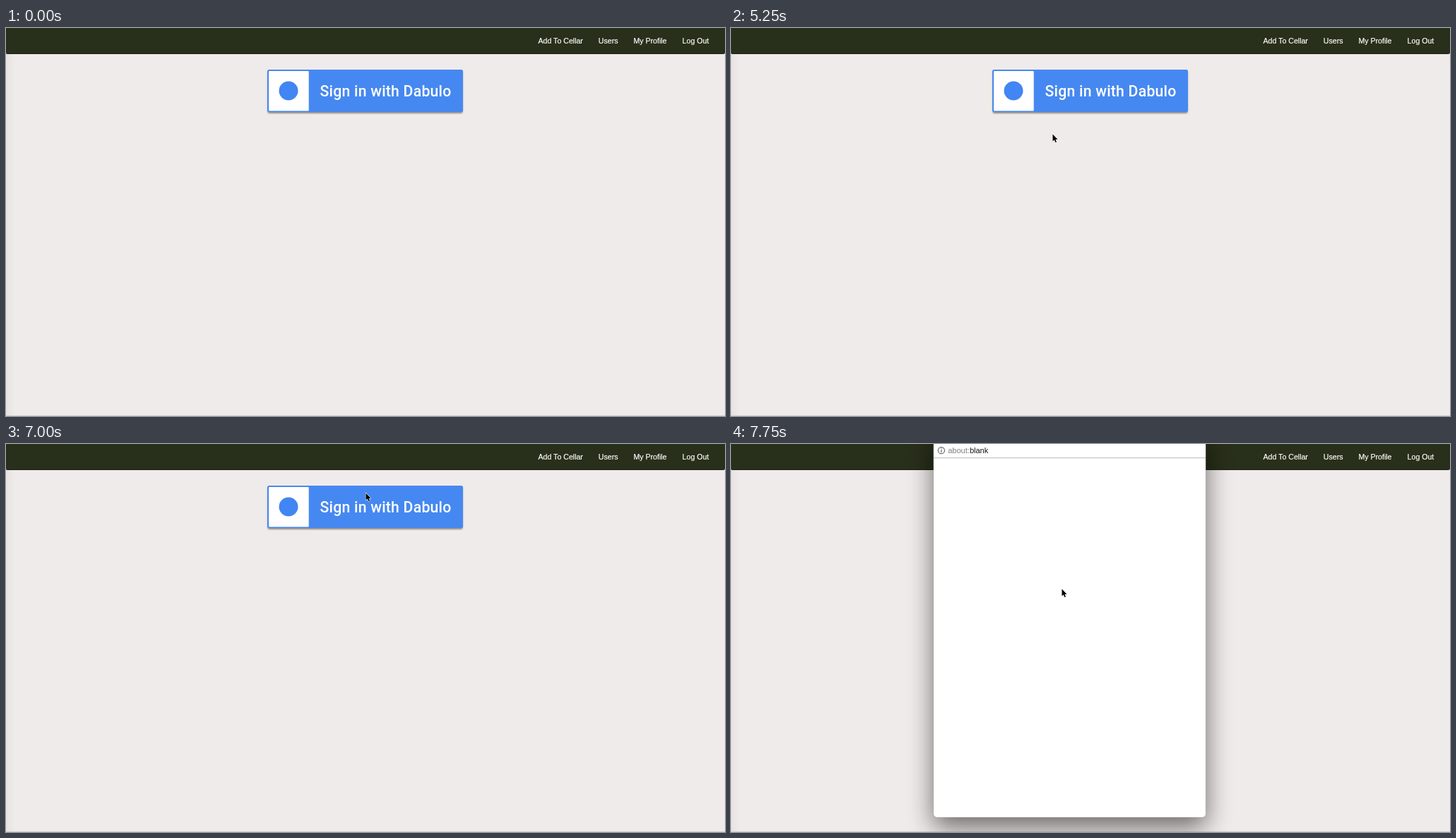
Animation of 1018 by 550 pixels, one loop 8000 ms. Source, as an HTML page:

```html
<!DOCTYPE html>
<html lang="en">
<head>
<meta charset="utf-8">
<title>Sign in</title>
<style>
  html, body { margin: 0; width: 100%; height: 100%; overflow: hidden; background: #efebea; }
  svg { display: block; width: 100vw; height: 100vh; }
  .nav { font: 10.6px "Liberation Sans", Arial, sans-serif; fill: #fff; stroke: #fff; stroke-width: .2; }
  .label { font: 500 21.2px Roboto, sans-serif; letter-spacing: .23px; }
  .address { font: 11px "Liberation Sans", Arial, sans-serif; }
</style>
</head>
<body>
<svg viewBox="0 0 1018 550" xmlns="http://www.w3.org/2000/svg">
  <defs>
    <linearGradient id="edge">
      <stop offset="0" stop-color="#000" stop-opacity=".035"/>
      <stop offset="1" stop-color="#000" stop-opacity="0"/>
    </linearGradient>
    <filter id="soft" x="-10%" y="-20%" width="120%" height="140%">
      <feGaussianBlur stdDeviation="1.3"/>
    </filter>
    <filter id="deep" filterUnits="userSpaceOnUse" x="200" y="-110" width="560" height="740">
      <feGaussianBlur stdDeviation="18"/>
    </filter>
  </defs>

  <rect width="1018" height="550" fill="#efebea"/>
  <rect y="37" width="13" height="513" fill="url(#edge)"/>
  <rect y="549" width="1018" height="1" fill="#d2cfcf"/>

  <path d="M0 0H1018V34.5Q1018 37 1015.5 37H2Q0 37 0 35Z" fill="#282f1a"/>
  <rect x="1" y="36" width="1015" height="1" fill="#1d2311"/>
  <g class="nav">
    <text x="753.5" y="22">Add To Cellar</text>
    <text x="838.8" y="22">Users</text>
    <text x="888.4" y="22">My Profile</text>
    <text x="957.6" y="22">Log Out</text>
  </g>

  <rect x="370.5" y="61" width="276" height="60" rx="2.5" fill="#000" opacity=".42" filter="url(#soft)"/>
  <rect x="370" y="59" width="277" height="60" rx="2.5" fill="#4688f1"/>
  <g id="face" fill="#fff">
    <rect x="372" y="61" width="56.7" height="56.5" rx="1"/>
    <text class="label" x="444.6" y="96.6">Sign in with Dabulo</text>
  </g>
  <circle cx="400" cy="89" r="13.5" fill="#4285f4"/>
  <rect id="ring" x="357.5" y="51" width="302.5" height="77" rx="1.5" fill="none" stroke="#8abaf5" stroke-width="3"/>

  <g id="popup">
    <rect x="287" y="-5" width="385" height="548" rx="5" fill="#000" opacity=".56" filter="url(#deep)"/>
    <rect x="286.7" y="-19" width="385.5" height="548.3" rx="5" fill="#fff" stroke="#000" stroke-opacity=".2" stroke-width=".6"/>
    <path d="M287 0V-14Q287 -19 292 -19H667Q672 -19 672 -14V0Z" fill="#e3dfde"/>
    <circle cx="298" cy="-10" r="4.5" fill="#a39b9b"/>
    <circle cx="313" cy="-10" r="4.5" fill="#c9c4bd"/>
    <circle cx="328" cy="-10" r="4.5" fill="#9cb0a5"/>
    <rect x="287" y="19" width="385" height="1.2" fill="#c4c4c4"/>
    <circle cx="297.8" cy="9.2" r="4.6" fill="none" stroke="#5a5a5a" stroke-width="1.1"/>
    <path d="M297.8 6.4v1.2M297.8 8.6v3.3" stroke="#5a5a5a" stroke-width="1.2"/>
    <g class="address">
      <text x="307.2" y="13" fill="#7d7d7d">about:</text>
      <text x="337.9" y="13" fill="#111">blank</text>
    </g>
  </g>

  <path id="cursor" d="M.5 .4V10.6L2.8 8.5L4.4 12.3L6 11.6L4.5 8H7.5Z" fill="#000" stroke="#fff" stroke-width="1.1" stroke-linejoin="round" paint-order="stroke"/>
</svg>
<script>
  const LOOP = 8000;
  const [face, ring, popup, cursor] = ["face", "ring", "popup", "cursor"].map(id => document.getElementById(id));

  // Pointer stops: start time, x, y
  const stops = [
    [500, 468, 177], [750, 426, 83.5], [1000, 474, 135.5], [1250, 455, 150],
    [5500, 452, 115], [5750, 478, 108], [6000, 469, 113], [6250, 487.5, 78.5],
    [6500, 490, 75.5], [6750, 509, 51], [7000, 509, 69], [7750, 468, 205]
  ];

  const show = (el, on) => el.setAttribute("visibility", on ? "visible" : "hidden");

  function draw(t) {
    const stop = stops.filter(s => s[0] <= t).pop();
    show(cursor, stop);
    if (stop) cursor.setAttribute("transform", `translate(${stop[1]} ${stop[2]})`);

    const pressed = t >= 7250;
    const open = t >= 7500;
    show(ring, pressed);
    show(popup, pressed);
    face.setAttribute("fill", pressed ? "#f5f4f4" : "#fff");

    const scale = open ? 1 : .301;
    const x = open ? 287 : 421;
    const bottom = open ? 529 : 338;
    popup.setAttribute("transform", `translate(${x} ${bottom}) scale(${scale}) translate(-287 -529)`);
    popup.setAttribute("opacity", open ? 1 : .42);
  }

  const start = performance.now();
  function tick() {
    draw((performance.now() - start) % LOOP);
    requestAnimationFrame(tick);
  }
  tick();
</script>
</body>
</html>
```
